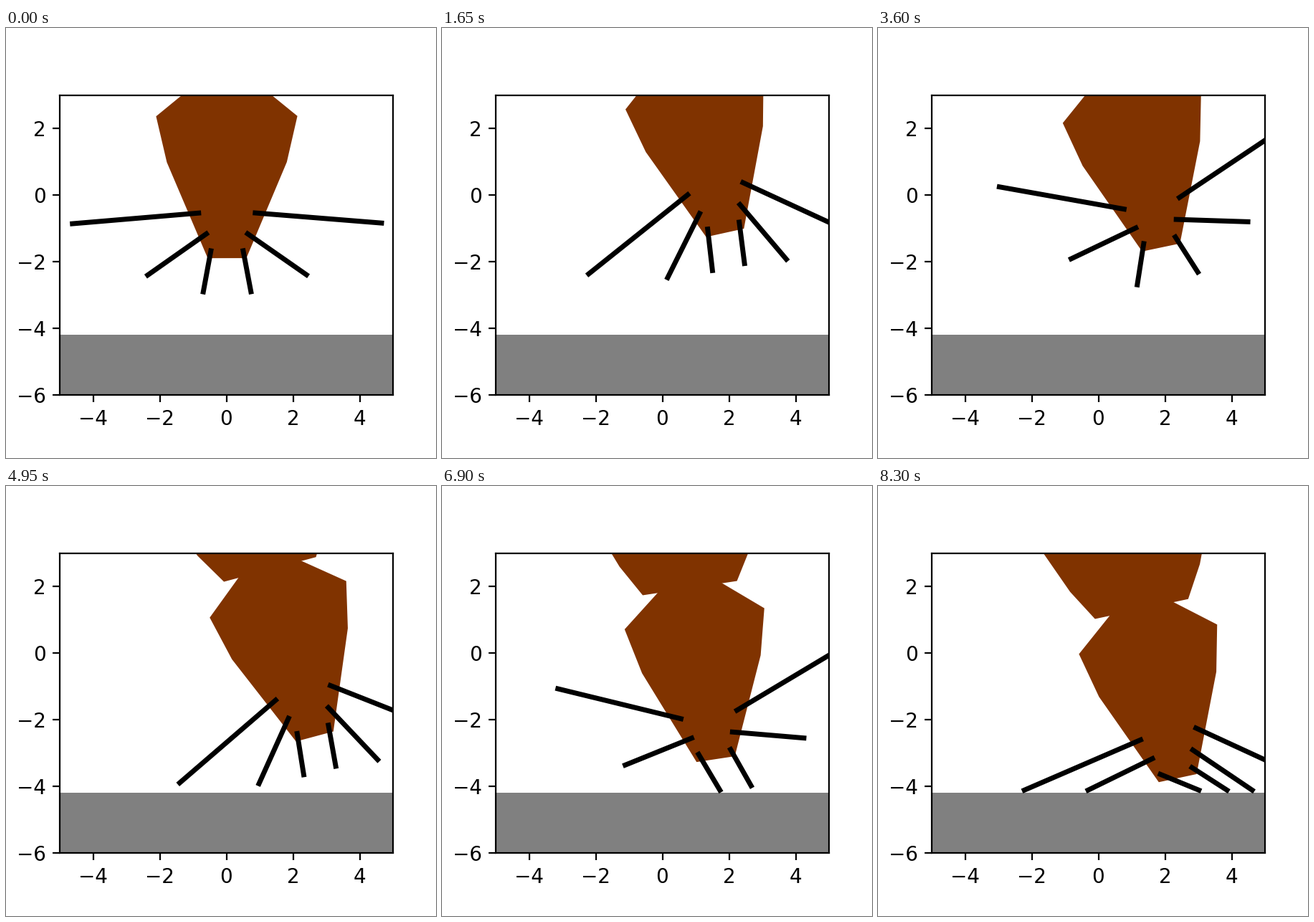
Recreate the animation shown at these times as a matplotlib script. Size 600 by 600 pixels, loop 8.35 s.

```python
import numpy as np
import matplotlib.pyplot as plt
from matplotlib.animation import FuncAnimation
from matplotlib.patches import Polygon, Rectangle

STEP = 50
FRAMES = 167
BROWN = (0.5, 0.2, 0)
GROUND = -4.185
CLEARANCE = 0.075
ANCHOR = 7.4            # height where the thread hangs
FLAP_PERIOD = 0.553
FLAP_PEAK = 1.65

# Turning points of the swing: time, x, y
SWING = np.array([
    (0.00, 0.02, -1.89), (0.90, 1.90, -1.40), (1.65, 1.88, -1.13),
    (3.60, 1.88, -1.57), (4.95, 2.65, -2.50), (5.80, 1.62, -2.43),
    (6.30, 0.85, -2.80), (6.90, 1.60, -3.18), (8.30, 2.38, -3.75),
])

# One side from outer to inner: hip, length, rest angle, flap gain
LEGS = [
    ((0.85, 1.355), 3.80, 4.7, 1.0),
    ((0.62, 0.73), 2.15, 35, 0.8),
    ((0.485, 0.22), 1.25, 79.4, 0.38),
]


def mirrored(*half):
    half = np.array(half)
    return np.vstack([half, half[::-1] * (-1, 1)])


THORAX = mirrored((0.58, 0), (1.80, 2.88), (2.12, 4.26), (0.92, 5.24))
ABDOMEN = mirrored((1.43, 5.19), (1.99, 6.14), (2.80, 8.08), (2.80, 11))


def smooth(t, times, values):
    """Cubic curve through the given points."""
    slopes = np.gradient(values, times)
    i = np.clip(np.searchsorted(times, t, side="right") - 1, 0, len(times) - 2)
    h = times[i + 1] - times[i]
    u = (t - times[i]) / h
    rise = u * u * (3 - 2 * u)
    return (values[i] + rise * (values[i + 1] - values[i])
            + h * u * (1 - u) * ((1 - u) * slopes[i] - u * slopes[i + 1]))


def body_pose(t):
    times, xs, ys = SWING.T
    x, y = smooth(t, times, xs), smooth(t, times, ys)
    return x, y, np.arctan2(x, ANCHOR - y)


def place(points, pose):
    x, y, tilt = pose
    c, s = np.cos(tilt), np.sin(tilt)
    return np.asarray(points) @ np.array([(c, s), (-s, c)]) + (x, y)


def leg_points(t, pose, side, hip, length, rest, gain):
    wave = min(t, 1) * np.cos(2 * np.pi * (t - FLAP_PEAK) / FLAP_PERIOD)
    lean = 5.5 * max(wave, 0)
    angle = np.radians(rest + 27 * gain * wave + side * lean) - side * pose[2]
    start = place((side * hip[0], hip[1]), pose)
    dx, drop = side * np.cos(angle), np.sin(angle)
    # Feet slide along the ground, upright legs fold to the right
    reach = (start[1] - GROUND - CLEARANCE) / length
    if drop > reach:
        way = 1 if abs(dx) < 0.25 else np.sign(dx)
        dx, drop = way * np.sqrt(1 - reach ** 2), reach
    return np.array([start, start + length * np.array([dx, -drop])])


fig, ax = plt.subplots(figsize=(3, 3), dpi=200)
ax.set_aspect("equal")
ax.set_xlim(-5, 5)
ax.set_ylim(-6, 3)
ax.set_xticks(range(-4, 5, 2))
ax.set_yticks(range(-6, 3, 2))

ax.add_patch(Rectangle((-5, -6), 10, 6 + GROUND, fc="gray", ec="none"))
parts = [(shape, ax.add_patch(Polygon(shape, fc=BROWN, ec="none")))
         for shape in (THORAX, ABDOMEN)]
legs = [((side, *leg), ax.plot([], [], color="black", lw=2.5)[0])
        for side in (-1, 1) for leg in LEGS]


def draw(frame):
    t = frame * STEP / 1000
    pose = body_pose(t)
    for shape, patch in parts:
        patch.set_xy(place(shape, pose))
    for leg, line in legs:
        line.set_data(*leg_points(t, pose, *leg).T)
    return [artist for _, artist in parts + legs]


anim = FuncAnimation(fig, draw, frames=FRAMES, interval=STEP, repeat=True)
plt.show()
```
